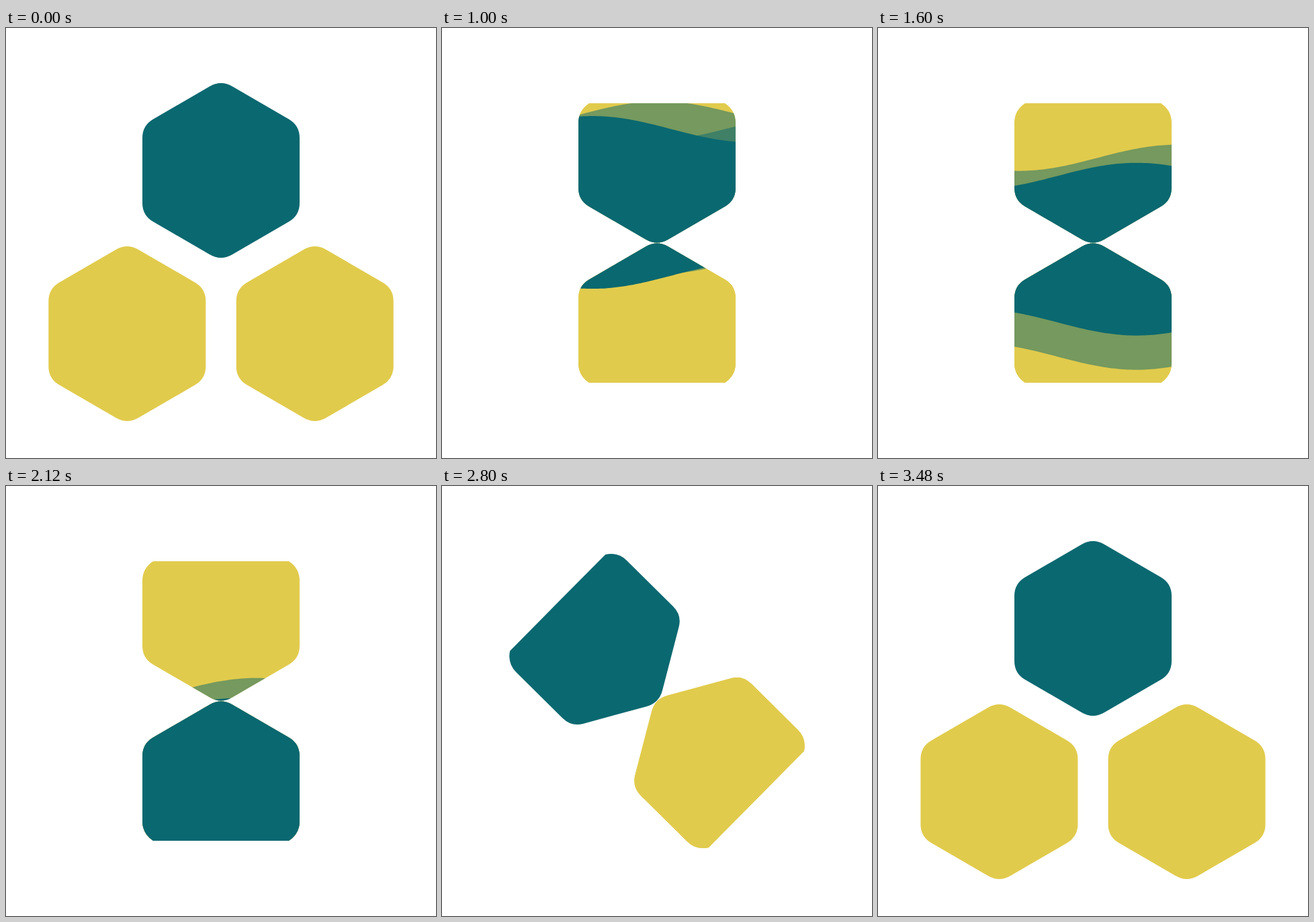
These frames come from a looping animation (640x640 px, 3760 ms). An HTML page:

```html
<!DOCTYPE html>
<html lang="en">
<head>
<meta charset="utf-8">
<title>Hourglass</title>
<style>
  html, body { margin: 0; width: 100%; height: 100%; overflow: hidden; background: #fff; }
  svg { display: block; width: 100vw; height: 100vh; }
</style>
</head>
<body>
<svg viewBox="0 0 640 640">
  <defs>
    <clipPath id="topClip"><path id="topGlass" transform="translate(320 189.5)"/></clipPath>
    <clipPath id="lowClip"><path id="lowGlass" transform="translate(320 450.5) scale(1 -1)"/></clipPath>
  </defs>
  <g id="cells">
    <path id="left" fill="#e1cb4c"/>
    <path id="right" fill="#e1cb4c"/>
    <path id="head"/>
  </g>
  <g id="topWaves" clip-path="url(#topClip)" fill="#0a6870"></g>
  <g id="lowWaves" clip-path="url(#lowClip)" fill="#0a6870"></g>
</svg>
<script>
const LOOP = 3760, TEAL = '#0a6870', YELLOW = '#e1cb4c';
const POUR = 640, TURN = 2407, SPLIT = 2789, SPAN = 717;
const AMP = 19.5, PERIOD = 470, DROP = 218;
const $ = id => document.getElementById(id);
const mix = (a, b, p) => a + (b - a) * p;
const unit = (t, from, span) => Math.min(1, Math.max(0, (t - from) / span));

function expo(x) {
  if (x <= 0 || x >= 1) return x;
  return x < 0.5 ? 2 ** (20 * x - 10) / 2 : 1 - 2 ** (10 - 20 * x) / 2;
}
const cubic = x => x < 0.5 ? 4 * x ** 3 : 1 - 4 * (1 - x) ** 3;

// Rounded hexagon whose upper point is pressed flat as p falls to 0.
function cell(p) {
  const y = v => mix(-77.5, v, p);
  return `M-17 ${y(-125)}Q0 ${y(-135)} 17 ${y(-125)}L101 ${y(-76.3)}` +
    'Q117 -67 117 -48.5V48.5Q117 67 101 76.3L17 125Q0 135 -17 125L-101 76.3' +
    `Q-117 67 -117 48.5V-48.5Q-117 -67 -101 ${y(-76.3)}Z`;
}

// Waves from back to front: mean level and crest position at each key time.
const KEYS = [640, 1240, 1600, 2120, 2400];
const WAVES = [
  { level: [70, 163.5, 193, 305, 370], crest: [970, 670, 445, 373, 350], alpha: 0.5 },
  { level: [80, 193, 271, 385, 440], crest: [740, 445, 385, 300, 270], alpha: 0.5 },
  { level: [92, 186, 220, 335, 400], crest: [390, 110, -85, -125, -150], alpha: 1 }
];

function along(values, t) {
  const last = KEYS.length - 1;
  let i = 0;
  while (i < last - 1 && t >= KEYS[i + 1]) i++;
  const slope = k => {
    const a = Math.max(0, k - 1), b = Math.min(last, k + 1);
    return (values[b] - values[a]) / (KEYS[b] - KEYS[a]);
  };
  const h = KEYS[i + 1] - KEYS[i], u = unit(t, KEYS[i], h);
  const bend = u * (1 - u) * h;
  return mix(values[i], values[i + 1], u * u * (3 - 2 * u)) +
    bend * ((1 - u) * slope(i) - u * slope(i + 1));
}

function wavePath(level, crest, amp, edge) {
  let d = `M200 ${edge}`;
  for (let x = 200; x <= 440; x += 4) {
    const y = level - amp * Math.cos((x - crest) / PERIOD * 2 * Math.PI);
    d += `L${x} ${y.toFixed(2)}`;
  }
  return d + `L440 ${edge}Z`;
}

function addWave(parent, alpha) {
  const path = document.createElementNS('http://www.w3.org/2000/svg', 'path');
  path.setAttribute('fill-opacity', alpha);
  return $(parent).appendChild(path);
}
for (const w of WAVES) {
  w.top = addWave('topWaves', w.alpha);
  w.low = addWave('lowWaves', w.alpha);
}
$('topGlass').setAttribute('d', cell(0));
$('lowGlass').setAttribute('d', cell(0));

function place(id, d, transform) {
  $(id).setAttribute('d', d);
  $(id).setAttribute('transform', transform);
}

function draw(t) {
  const open = t < 1500 ? 1 - cubic(unit(t, 400, 240)) : expo(unit(t, SPLIT, SPAN));
  const d = cell(open), y = mix(450.5, 455, open), gap = 139.7 * open;
  place('head', d, `translate(320 ${mix(189.5, 212, open)})`);
  place('left', d, `translate(${320 - gap} ${y}) scale(1 -1)`);
  place('right', d, `translate(${320 + gap} ${y}) scale(1 -1)`);

  // The poured glass equals the empty one upside down, so the turn ends at 0.
  const angle = t < TURN ? 0 : 180 * (expo(unit(t, TURN, SPAN)) - 1);
  $('cells').setAttribute('transform', `rotate(${angle} 320 320)`);

  const pouring = t >= POUR && t < TURN;
  $('head').setAttribute('fill', pouring ? YELLOW : TEAL);
  for (const id of ['topWaves', 'lowWaves']) {
    $(id).setAttribute('visibility', pouring ? 'visible' : 'hidden');
  }
  if (!pouring) return;
  for (const w of WAVES) {
    const level = along(w.level, t), crest = along(w.crest, t);
    w.top.setAttribute('d', wavePath(level, crest, AMP, 560));
    w.low.setAttribute('d', wavePath(level + DROP, crest, -AMP, 80));
  }
}

const start = performance.now();
function tick() {
  draw((performance.now() - start) % LOOP);
  requestAnimationFrame(tick);
}
tick();
</script>
</body>
</html>
```
